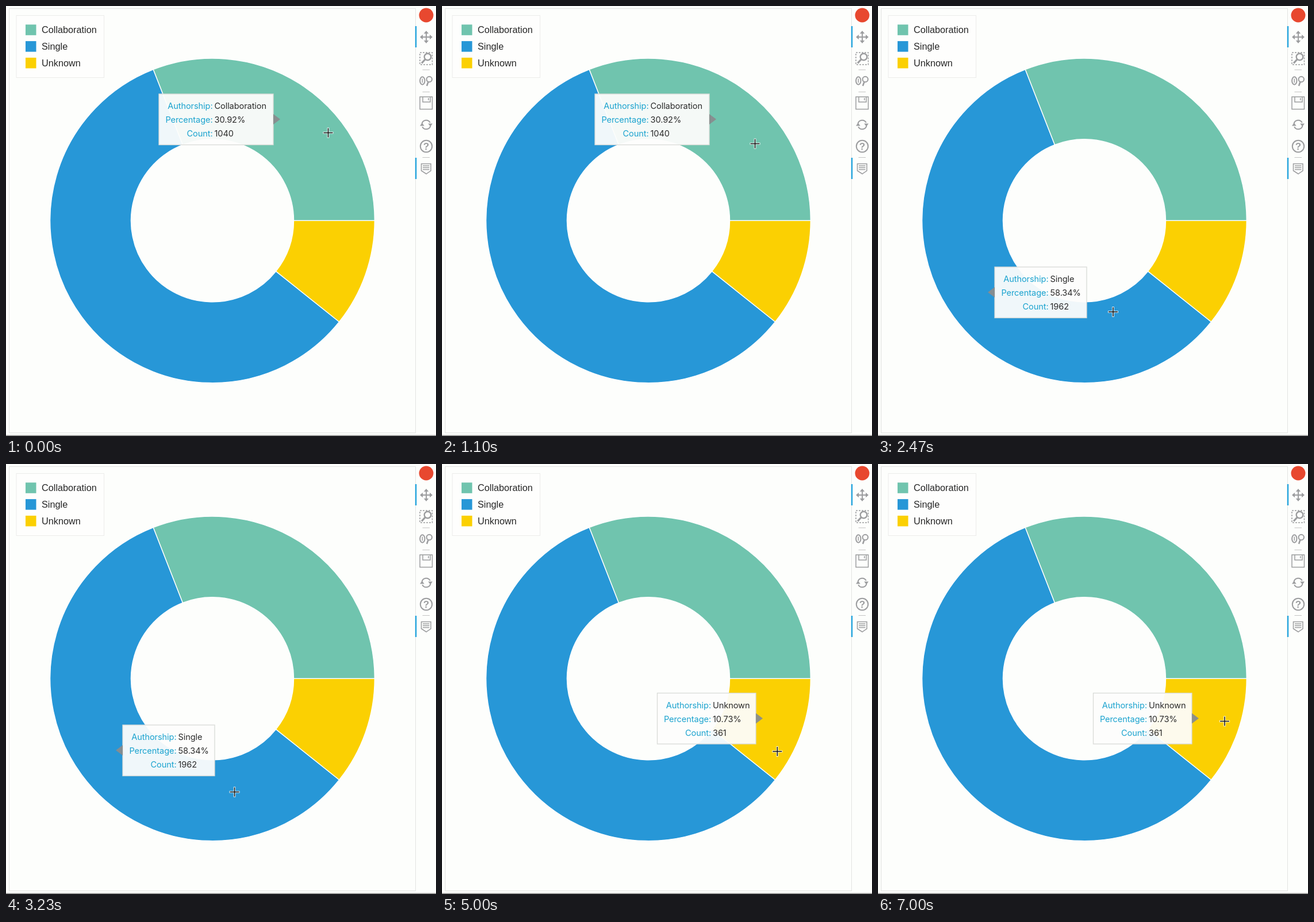
These frames come from a looping animation (748 by 748 pixels, 7030 ms). An HTML page:

```html
<!DOCTYPE html>
<html lang="en">
<head>
<meta charset="utf-8">
<title>Authorship donut chart</title>
<style>
  html, body { margin: 0; width: 100%; height: 100%; overflow: hidden; background: #fdfefc; }
  svg { display: block; width: 100%; height: 100%; }
  #legend text { font: 16.25px "Liberation Sans", Arial, sans-serif; fill: #262626; }
  #tip text { font: 14.6px Inter, "Open Sans", sans-serif; letter-spacing: -.1px; fill: #2b2b2b; }
  #tip .label { fill: #1ba3cf; text-anchor: end; }
  #tools { fill: none; stroke: #9c9d9f; stroke-width: 2; }
  #tools .solid { fill: #9c9d9f; stroke: none; }
  #tools .thin { stroke-width: 1.5; }
  #tools text { font: bold 17px "Liberation Sans", Arial, sans-serif; text-anchor: middle; }
</style>
</head>
<body>
<svg viewBox="0 0 748 748">
  <rect x="5.5" y="4.5" width="707" height="738" fill="none" stroke="#e2e3e1"/>
  <path d="M0 747.3H748" stroke="#929292" stroke-width="1.4"/>

  <g id="ring" stroke="#fff" stroke-width="1.4" stroke-linejoin="round"></g>
  <g id="legend"><rect x="18" y="16.5" width="152.5" height="108" fill="#fefefd" stroke="#ececea"/></g>

  <g id="tools">
    <circle cx="731" cy="16" r="12.5" fill="#e8482f" stroke="none"/>
    <path d="M713 35V72M713 264V301" stroke="#26a5dc" stroke-width="2.5"/>
    <path d="M724.5 111H737M724.5 149.5H737M724.5 263.5H737" stroke="#c4c4c4" stroke-width="1.2"/>
    <g transform="translate(731 54)">
      <path d="M-8 0H8M0-8V8"/>
      <path class="solid" d="M-11 0l5-4.2v8.4zM11 0l-5-4.2v8.4zM0-11l-4.2 5h8.4zM0 11l-4.2-5h8.4z"/>
    </g>
    <rect class="thin" x="720" y="81" width="21.5" height="21" stroke-dasharray="3 2"/>
    <circle cx="733.5" cy="88.5" r="5.8" fill="#fdfefc" stroke-width="2.4"/>
    <path d="M729 93L723 99.5" stroke-width="3.2"/>
    <ellipse cx="724.3" cy="130" rx="4.2" ry="6.7"/>
    <path class="thin" d="M724.3 126.5V133.5"/>
    <circle cx="736.3" cy="127.5" r="4.7"/>
    <path d="M734.5 132L732 139" stroke-width="2.5"/>
    <rect class="thin" x="720" y="158" width="21.5" height="21.5"/>
    <path class="thin" d="M725 158V167H738V158M734.8 160V164"/>
    <g transform="translate(731 206.5)">
      <path d="M-7.5-2A7.7 7.7 0 0 1 6.8-3.6M7.5 2A7.7 7.7 0 0 1-6.8 3.6"/>
      <path class="solid" d="M3.3-2H11L7.3 3.2zM-3.3 2H-11L-7.3-3.2z"/>
    </g>
    <circle cx="731" cy="244" r="10.2"/>
    <text class="solid" x="731" y="250">?</text>
    <path class="thin" d="M722.5 274.5H739V286.5L731 292L722.5 286.5zM725 278H736.5M725 281.3H736.5M725 284.6H736.5"/>
  </g>

  <g id="tip"></g>
  <g id="cursor" fill="none">
    <path d="M-9 0H9M0-9V9" stroke="#fff" stroke-opacity=".85" stroke-width="3.6"/>
    <path d="M-8 0H8M0-8V8" stroke="#111" stroke-width="1.5"/>
  </g>
</svg>
<script>
const $ = id => document.getElementById(id);
const CX = 359, CY = 373.3, OUTER = 282.3, INNER = 141.5, LOOP = 7030, TAU = 2 * Math.PI;

// Clockwise from three o'clock; arrow: 1 points right, -1 points left.
const slices = [
  { name: "Unknown", share: 10.73, count: 361, color: "#fbd002", x: 374.5, y: 398.5, w: 171.5, arrow: 1 },
  { name: "Single", share: 58.34, count: 1962, color: "#2797d7", x: 203, y: 454, w: 160, arrow: -1 },
  { name: "Collaboration", share: 30.92, count: 1040, color: "#70c4ae", x: 266, y: 153, w: 199, arrow: 1 }
];

// Pointer stops: time, x, y
const stops = [
  [0, 560.5, 220.5], [330, 554.5, 228.3], [750, 545, 239], [1500, 544, 240],
  [2300, 414, 521], [2470, 409, 532], [3300, 396.5, 574], [4200, 397, 574],
  [4850, 583, 501], [5000, 583.3, 500], [5170, 584, 494], [5870, 602, 464],
  [6500, 603, 448], [LOOP, 603, 447.5]
];

function point(r, turn) {
  const a = turn * TAU;
  return `${CX + r * Math.cos(a)} ${CY + r * Math.sin(a)}`;
}

function wedge(from, to) {
  const big = to - from > .5 ? 1 : 0;
  return `M${point(OUTER, from)}A${OUTER} ${OUTER} 0 ${big} 1 ${point(OUTER, to)}` +
    `L${point(INNER, to)}A${INNER} ${INNER} 0 ${big} 0 ${point(INNER, from)}Z`;
}

function tipMarkup(s) {
  const rows = [["Authorship:", s.name], ["Percentage:", s.share + "%"], ["Count:", s.count]];
  const edge = s.arrow > 0 ? s.w : 0;
  return `<g transform="translate(${s.x} ${s.y})">
    <rect width="${s.w}" height="88.5" fill="#fdfdfc" fill-opacity=".94" stroke="#d9dbd7" stroke-width="1.3"/>
    <path d="M${edge} 35v18l${12 * s.arrow}-9z" fill="#888c8e" fill-opacity=".95"/>` +
    rows.map(([label, value], i) => `<text class="label" x="93.5" y="${26 + i * 24}">${label}</text>
    <text x="96.5" y="${26 + i * 24}">${value}</text>`).join("") + "</g>";
}

let end = 0;
for (const s of slices) {
  s.from = end;
  s.to = end += s.share / 100;
  if (s === slices[2]) s.to = 1;
  $("ring").innerHTML += `<path d="${wedge(s.from, s.to)}" fill="${s.color}"/>`;
}
[...slices].sort((a, b) => a.name < b.name ? -1 : 1).forEach((s, i) => {
  const y = 32.3 + i * 28.8;
  $("legend").innerHTML += `<rect x="34" y="${y}" width="18.5" height="18.5" fill="${s.color}"/>
    <text x="62" y="${y + 14.7}">${s.name}</text>`;
});

function pointer(t) {
  const i = stops.findIndex(s => s[0] > t);
  const [t0, x0, y0] = stops[i - 1], [t1, x1, y1] = stops[i];
  const k = (t - t0) / (t1 - t0);
  return [x0 + (x1 - x0) * k, y0 + (y1 - y0) * k];
}

function sliceAt(x, y) {
  const r = Math.hypot(x - CX, y - CY);
  if (r < INNER || r > OUTER) return null;
  const turn = (Math.atan2(y - CY, x - CX) / TAU + 1) % 1;
  return slices.find(s => turn < s.to);
}

let shown;
const start = performance.now();
function draw() {
  const [x, y] = pointer((performance.now() - start) % LOOP);
  $("cursor").setAttribute("transform", `translate(${x} ${y})`);
  const hit = sliceAt(x, y);
  if (hit !== shown) {
    shown = hit;
    $("tip").innerHTML = hit ? tipMarkup(hit) : "";
  }
  requestAnimationFrame(draw);
}
draw();
</script>
</body>
</html>
```
